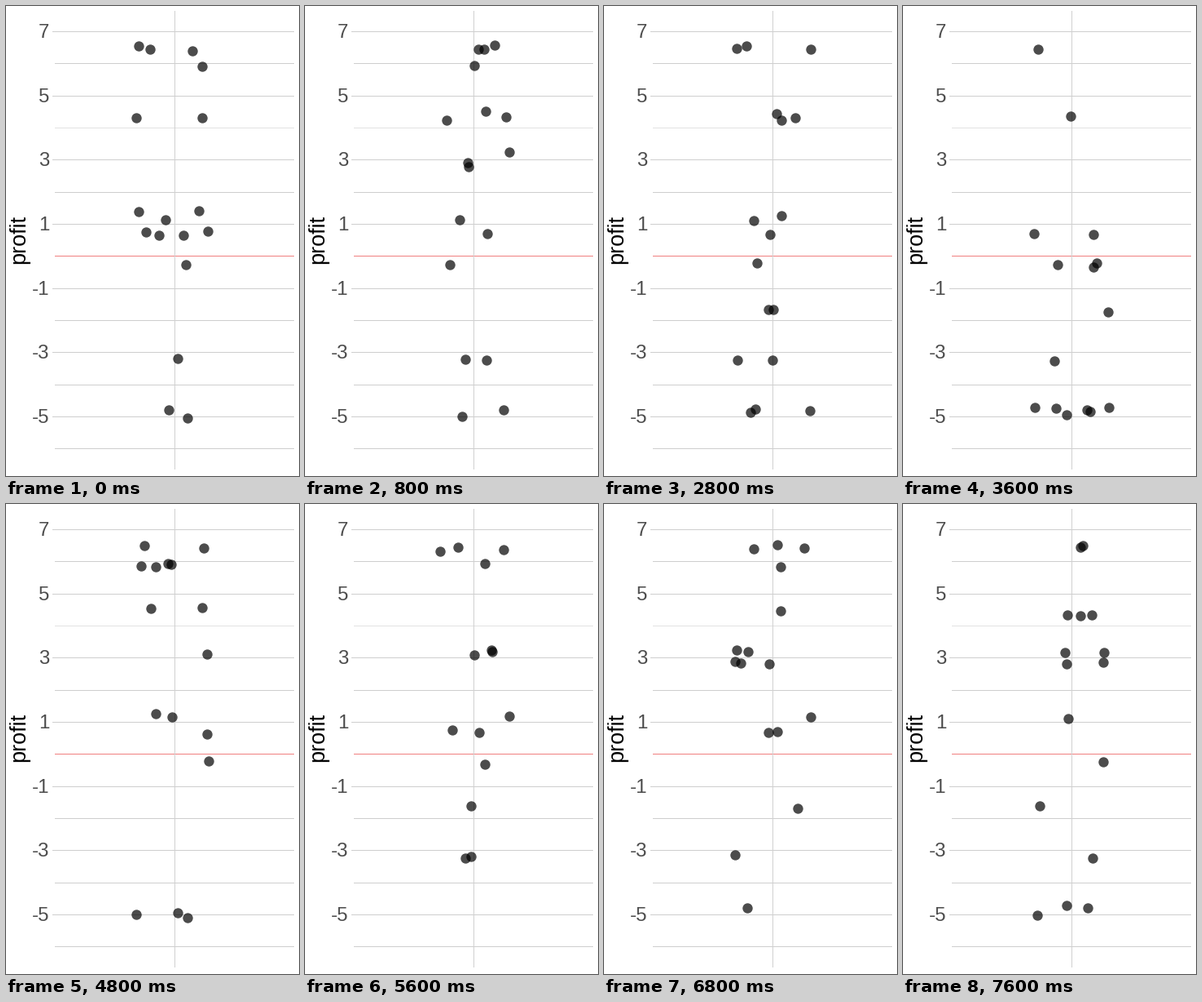
Recreate the animation shown at these times as a matplotlib script. Size 360 px wide and 576 px high, loop 8 s.

```python
import numpy as np
import matplotlib.pyplot as plt
from matplotlib.animation import FuncAnimation

W, H, DPI = 360, 576, 72
STEPS, STEP_MS = 20, 400
ZERO, UNIT = 306.3, 39.33          # pixel row of profit 0, pixels per unit
LEFT, RIGHT, MIDDLE = 60, 354, 207.5
JITTER_X, JITTER_Y = 47, 0.08      # sideways in pixels, upwards in profit

plt.rcParams["font.family"] = "Liberation Sans"
plt.rcParams["axes.unicode_minus"] = False

OUTCOMES = [6.5, 6.4, 5.88, 4.5, 4.28, 3.17, 2.85, 1.32,
            1.1, 0.68, -0.28, -1.68, -3.2, -4.8, -5.02]


def row(profit):
    return ZERO - UNIT * profit


def resample(step):
    """Bootstrap draw of the outcomes, jittered around the middle line."""
    rng = np.random.default_rng(step)
    profit = rng.choice(OUTCOMES, rng.integers(14, 18))
    x = MIDDLE - 0.5 + rng.uniform(-JITTER_X, JITTER_X, profit.size)
    y = row(profit + rng.uniform(-JITTER_Y, JITTER_Y, profit.size))
    return np.column_stack([x, y])


fig = plt.figure(figsize=(W / DPI, H / DPI), dpi=DPI, facecolor="white")
ax = fig.add_axes([0, 0, 1, 1])
ax.set(xlim=(0, W), ylim=(H, 0))
ax.axis("off")


def rule(xs, ys, color):
    ax.plot(xs, ys, color=color, lw=1, snap=False,
            solid_capstyle="butt", zorder=1)


def grid_color(profit):
    if profit == 0:
        return "#f08080"
    return "#e2e2e2" if profit == 4 else "#cecece"


for profit in range(-6, 8):
    y = round(row(profit)) + 0.5
    labelled = profit % 2 == 1
    rule([LEFT - 3 * labelled, RIGHT], [y, y], grid_color(profit))
    if labelled:
        ax.text(53, y + 7.6, str(profit), size=24, color="#4d4d4d",
                ha="right", va="baseline")

rule([MIDDLE, MIDDLE], [6, 568], "#d0d0d0")
ax.text(23, 285.5, "profit", size=27, color="black", rotation=90,
        rotation_mode="anchor", ha="center", va="baseline")

dots = ax.scatter([], [], s=12.4 ** 2, c="black", alpha=0.7,
                  linewidths=0, zorder=3)


def update(step):
    dots.set_offsets(resample(step))
    return [dots]


anim = FuncAnimation(fig, update, frames=STEPS, interval=STEP_MS,
                     repeat=True, repeat_delay=0, blit=False)
plt.show()
```
